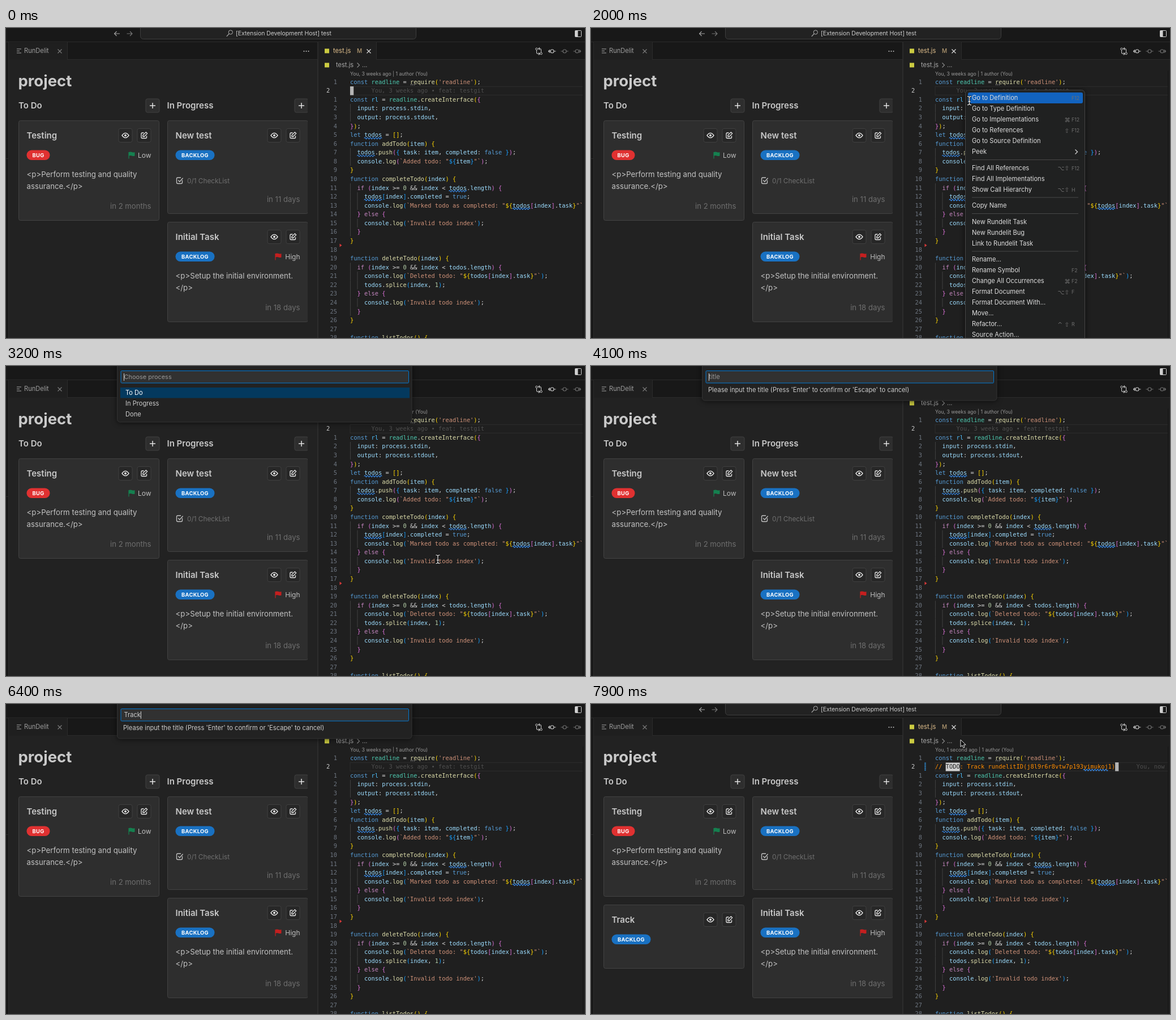
Recreate the animation shown at these times as an HTML page. Size 1023x547 px, loop 8000 ms.

```html
<!DOCTYPE html>
<html lang="en">
<head>
<meta charset="utf-8">
<title>Board and editor</title>
<style>
  html, body { margin: 0; width: 100%; height: 100%; overflow: hidden; background: #181818; }
  svg { display: block; width: 1023px; height: 547px; }
  text { white-space: pre; font-family: Inter, "Open Sans", sans-serif; }
  .mono { font-family: "DejaVu Sans Mono", "Liberation Mono", monospace; }
  .keys { font-family: "DejaVu Sans", sans-serif; }
  .float { filter: drop-shadow(0 1px 5px rgba(0, 0, 0, .6)); }
</style>
</head>
<body>
<svg id="stage" viewBox="0 0 1023 547" xmlns="http://www.w3.org/2000/svg">
  <clipPath id="boardClip"><rect x="4" y="55" width="529" height="492"/></clipPath>
  <clipPath id="codeClip"><rect x="551" y="55" width="468" height="492"/></clipPath>
</svg>
<script type="module">
const LOOP = 8000, STEP = 100;
const T = { menu: 1700, menuEnd: 2900, pick: 3000, title: 4100, done: 6600, insert: 6900, card: 7100, back: 7500 };
const stage = document.getElementById('stage');

const el = (parent, tag, attrs = {}, text) => {
  const node = document.createElementNS('http://www.w3.org/2000/svg', tag);
  for (const key in attrs) node.setAttribute(key, attrs[key]);
  if (text !== undefined) node.textContent = text;
  return parent.appendChild(node);
};
const group = (parent, attrs) => el(parent, 'g', attrs);
const rect = (parent, x, y, width, height, fill, attrs) =>
  el(parent, 'rect', { x, y, width, height, fill, ...attrs });
const line = (parent, d, stroke, width = 1, attrs) =>
  el(parent, 'path', { d, stroke, 'stroke-width': width, fill: 'none', ...attrs });
// y is the visual middle of the line of text
const label = (parent, x, y, size, fill, text, attrs) =>
  el(parent, 'text', { x, y: y + size * .355, 'font-size': size, fill, ...attrs }, text);
const show = (node, on) => node.setAttribute('visibility', on ? 'visible' : 'hidden');

/* ---------- window frame ---------- */
const cross = (x, y, color) => line(stage, `M${x - 3.5} ${y - 3.5}l7 7m0 -7l-7 7`, color, 1.1);

rect(stage, 0, 0, 1023, 547, '#181818');
rect(stage, 4, 55, 547, 492, '#222222');
rect(stage, 4, 26, 104, 30, '#1f1f1f');
rect(stage, 551, 55, 472, 492, '#1f1f1f');
rect(stage, 551, 26, 103, 30, '#1f1f1f');
line(stage, 'M0 24.5H1023M108.5 25V55.5H550M654.5 25V55.5H1023M4.5 25V547M0 230.5H4', '#2b2b2b');
line(stage, 'M551 25V547', '#383838');

line(stage, 'M19 37H27M19 40.5H24M19 44H27', '#a8a8a8', 1.2);
label(stage, 32, 40.5, 11.1, '#9d9d9d', 'RunDelit');
cross(95, 41, '#7c7c7c');
[526.5, 530.5, 534.5].forEach(cx => el(stage, 'circle', { cx, cy: 41, r: 1, fill: '#c0c0c0' }));
rect(stage, 563, 36.5, 8, 8, '#cbcb41');
label(stage, 578, 40.5, 11.2, '#e2c08d', 'test.js');
label(stage, 620, 40.5, 10, '#b39a72', 'M', { 'font-weight': 500 });
cross(641, 41, '#e0e0e0');

// editor actions
line(stage, 'M937.5 39V43Q937.5 45.5 940 45.5H943M941 43.3l2.2 2.2l-2.2 2.2M945.5 43V39Q945.5 36.5 943 36.5H941M943 34.3l-2.2 2.2l2.2 2.2', '#c4c4c4', 1.1);
for (const [cx, cy] of [[937.5, 37], [945.5, 45]])
  el(stage, 'circle', { cx, cy, r: 1.8, fill: '#181818', stroke: '#c4c4c4' });
const commit = (x, color, extra) => {
  el(stage, 'circle', { cx: x, cy: 41, r: 3, fill: 'none', stroke: color, 'stroke-width': 1.2 });
  line(stage, `M${x - 6.5} 41h3.5m6 0h3.5${extra}`, color, 1.2);
};
commit(965, '#c4c4c4', 'M961 38.5l-2.5 2.5l2.5 2.5');
commit(987, '#6c6c6c', '');
commit(1009, '#6c6c6c', 'M1013 38.5l2.5 2.5l-2.5 2.5');
rect(stage, 1005.5, 4.5, 11, 11, 'none', { rx: 1, stroke: '#d0d0d0' });
rect(stage, 1005.5, 4.5, 5, 11, '#d0d0d0');

const command = group(stage);
line(command, 'M201 10H191.5M195.5 6l-4 4l4 4', '#a5a5a5', 1.1);
line(command, 'M213.5 10H223M219 6l4 4l-4 4', '#777777', 1.1);
rect(command, 237.5, -6, 487, 25.5, '#222222', { rx: 5, stroke: '#3d3d3d' });
el(command, 'circle', { cx: 396.8, cy: 7.5, r: 3.6, fill: 'none', stroke: '#b0b0b0' });
line(command, 'M394.2 10.2L389.8 14.8', '#b0b0b0', 1.2);
label(command, 406, 9.5, 10.5, '#cccccc', '[Extension Development Host] test', { 'letter-spacing': -.1 });

/* ---------- board ---------- */
const board = group(stage, { 'clip-path': 'url(#boardClip)' });
const heading = { 'font-weight': 600 };

function button(parent, x, y, icon, fill = '#272727') {
  rect(parent, x - 12, y - 12, 24, 24, fill, { rx: 3, stroke: '#404040' });
  const g = group(parent, { transform: `translate(${x} ${y})` });
  if (icon === 'plus') line(g, 'M-5 0H5M0 -5V5', '#e4e4e4', 1.5);
  if (icon === 'eye') {
    line(g, 'M-6 0Q0 -8.4 6 0Q0 8.4 -6 0Z', '#ececec', 1.3);
    el(g, 'circle', { r: 1.9, fill: '#ececec' });
  }
  if (icon === 'edit')
    line(g, 'M-.5 -4.5H-3.5Q-5 -4.5 -5 -3V3.5Q-5 5 -3.5 5H3Q4.5 5 4.5 3.5V.8M-2 2V-.5L3.3 -5.7L5.6 -3.4L.4 2Z', '#ececec', 1.3);
}

function card(x, y, height, title, badge, o = {}) {
  const g = group(board, { transform: `translate(${x} ${y})` });
  rect(g, .5, .5, 248, height - 1, '#2e2e2e', { rx: 3, stroke: '#424242' });
  label(g, 14.5, 26.5, 15, '#c9c9c9', title, heading);
  button(g, 189, 26.5, 'eye');
  button(g, 222, 26.5, 'edit');
  const bug = badge === 'BUG', width = bug ? 41 : 69;
  rect(g, 14.5, 52.5, width, 17.5, bug ? '#e03131' : '#1971c2', { rx: 8.75 });
  label(g, 14.5 + width / 2, 61.3, 9.4, '#ffffff', badge,
    { 'font-weight': 700, 'letter-spacing': .3, 'text-anchor': 'middle' });
  if (o.level) {
    const fx = o.level === 'Low' ? 195 : 191;
    line(g, `M${fx} 56V67.5`, o.flag, 1.2);
    el(g, 'path', { d: `M${fx} 56q3 -1.2 5.5 0t5 0v6.5q-2.5 1.2 -5 0t-5.5 0z`, fill: o.flag });
    label(g, 234.5, 61.5, 12, '#bdbdbd', o.level, { 'text-anchor': 'end' });
  }
  if (o.check) {
    line(g, 'M26.5 105.5V109.5Q26.5 111.5 24.5 111.5H18.5Q16.5 111.5 16.5 109.5V103Q16.5 101 18.5 101H24M19.3 105.5l2.5 2.7l5.8 -6.5', '#c4c4c4', 1.3);
    label(g, 35, 106.5, 11.8, '#707070', o.check);
  }
  (o.body || []).forEach((text, i) => label(g, 14.5, 95 + 21.6 * i, 13.25, '#c2c2c2', text));
  if (o.due) label(g, 234.5, height - 25.5, 13.15, '#6e6e6e', o.due, { 'text-anchor': 'end' });
  return g;
}

label(board, 21.5, 93, 27.5, '#c9c9c9', 'project', { 'font-weight': 700 });
label(board, 22, 137, 15, '#c9c9c9', 'To Do', heading);
label(board, 284.5, 137, 15, '#c9c9c9', 'In Progress', heading);
button(board, 259, 137, 'plus', '#2e2e2e');
button(board, 522, 137, 'plus', '#2e2e2e');
card(22, 163, 177, 'Testing', 'BUG', { level: 'Low', flag: '#15804f', due: 'in 2 months',
  body: ['<p>Perform testing and quality', 'assurance.</p>'] });
card(285, 163, 165, 'New test', 'BACKLOG', { check: '0/1 CheckList', due: 'in 11 days' });
card(285, 342, 177, 'Initial Task', 'BACKLOG', { level: 'High', flag: '#c41f1f', due: 'in 18 days',
  body: ['<p>Setup the initial environment.', '</p>'] });
const newCard = card(22, 354, 113, 'Track', 'BACKLOG');

/* ---------- editor ---------- */
const editor = group(stage, { 'clip-path': 'url(#codeClip)' });
const CODE = 10.36, ADV = CODE * .602, LEFT = 608, ROW = 15.575;
const rowY = i => 95 + ROW * i;
const colX = n => LEFT + n * ADV;
const mono = (parent, x, y, fill, text, attrs) =>
  label(parent, x, y, CODE, fill, text, { class: 'mono', ...attrs });

const SOURCE = `const readline = require('readline');

const rl = readline.createInterface({
  input: process.stdin,
  output: process.stdout,
});
let todos = [];
function addTodo(item) {
  todos.push({ task: item, completed: false });
  console.log(\`Added todo: "\${item}"\`);
}
function completeTodo(index) {
  if (index >= 0 && index < todos.length) {
    todos[index].completed = true;
    console.log(\`Marked todo as completed: "\${todos[index].task}"\`);
  } else {
    console.log('Invalid todo index');
  }
}

function deleteTodo(index) {
  if (index >= 0 && index < todos.length) {
    console.log(\`Deleted todo: "\${todos[index].task}"\`);
    todos.splice(index, 1);
  } else {
    console.log('Invalid todo index');
  }
}

function listTodos() {`.split('\n');

const BRACKETS = ['#ffd700', '#da70d6', '#179fff'], STRING = '#ce9178';
let depth = 0;
function colorOf(word, next) {
  if (/[([{]$/.test(word)) return BRACKETS[depth++ % 3];
  if (/^[)\]}]/.test(word)) return BRACKETS[--depth % 3];
  if (word[0] === "'") return STRING;
  if (/^(const|let|function|true|false)$/.test(word)) return '#569cd6';
  if (/^(if|else)$/.test(word)) return '#c586c0';
  if (/^\d/.test(word)) return '#b5cea8';
  if (!/^\w/.test(word)) return '#d4d4d4';
  if (next === '(') return '#dcdcaa';
  return { readline: '#4ec9b0', rl: '#4fc1ff' }[word] || '#9cdcfe';
}
function lex(text, out) {
  for (const m of text.matchAll(/'[^']*'|\$\{|[()[\]{}]|\w+|[^\w'$()[\]{}]+/g))
    el(out, 'tspan', { fill: colorOf(m[0], text[m.index + m[0].length]) }, m[0]);
}
function paint(text, out) {
  for (const part of text.split(/(`[^`]*`)/)) {
    if (part[0] !== '`') { lex(part, out); continue; }
    for (const bit of part.split(/(\$\{[^}]*\})/))
      bit[0] === '$' ? lex(bit, out) : el(out, 'tspan', { fill: STRING }, bit);
  }
}
const squiggle = (parent, col, row, chars) =>
  line(parent, `M${colX(col)} ${rowY(row) + 6}q1.2 -2.8 2.4 0` + 't2.4 0'.repeat(Math.round(chars * ADV / 2.4) - 1), '#3794ff', 1.1);

rect(editor, 563, 61.5, 8, 8, '#cbcb41');
label(editor, 583, 65.5, 11.1, '#a9a9a9', 'test.js');
line(editor, 'M620.5 61.5l4 4l-4 4', '#909090', 1.1);
label(editor, 629, 65.5, 11, '#a9a9a9', '...');
const author = label(editor, LEFT, 81, 8.7, '#999999', '');
rect(editor, LEFT, 103.3, 412, 15, 'none', { stroke: '#2d2d2d' });

SOURCE.forEach((text, row) => {
  const y = rowY(row), indent = text.search(/\S/);
  for (let col = 0; col < indent; col += 2)
    line(editor, `M${colX(col) + .5} ${y - ROW / 2}v${ROW}`, '#404040');
  if (row === 1) mono(editor, 566, y, '#cccccc', '2');
  else mono(editor, 585, y, '#6e7681', row ? row - 1 : 1, { 'text-anchor': 'end' });
  paint(text, mono(editor, LEFT, y, '#d4d4d4', ''));
});
[[4, 6], [2, 8], [28, 12], [4, 13], [46, 14]].forEach(([col, row]) => squiggle(editor, col, row, 5));
[715, 718, 721].forEach(x => rect(editor, x, 99.5, 1.3, 1.3, '#b0b0b0'));
el(editor, 'path', { d: 'M589.5 380.5l4 3l-4 3z', fill: '#d33a3a' });

const blame = mono(editor, colX(6), rowY(1), '#4e4e4e', 'You, 3 weeks ago • feat: testgit');
const todo = group(editor);
rect(todo, colX(3), 103.5, 4 * ADV, 15, '#d0d0d0');
const todoText = mono(todo, LEFT, rowY(1), '#ff8c00', '');
[['// '], ['TODO', '#1f1f1f'], [': Track rundelitID(j8l9r6r8vtw7p193yimukoj1)']].forEach(([s, fill = '#ff8c00']) =>
  el(todoText, 'tspan', { fill }, s));
squiggle(todo, 42, 1, 7);
mono(todo, colX(57), rowY(1), '#4e4e4e', 'You, now');
line(todo, 'M590.5 103.5v15', '#2f86c9', 2.5, { 'stroke-dasharray': '2 1' });
const block = rect(editor, LEFT, 103, ADV, 15.5, '#b4b4b4');
line(stage, 'M1019.5 75V547', '#151515');

/* ---------- context menu ---------- */
const MENU = ['Go to Definition|F12', 'Go to Type Definition', 'Go to Implementations|F12|⌘', 'Go to References|F12|⇧',
  'Go to Source Definition', 'Peek', '-', 'Find All References|F12|⇧|⌥', 'Find All Implementations',
  'Show Call Hierarchy|H|⇧|⌥', '-', 'Copy Name', '-', 'New Rundelit Task', 'New Rundelit Bug',
  'Link to Rundelit Task', '-', 'Rename...', 'Rename Symbol|F2', 'Change All Occurrences|F2|⌘',
  'Format Document|F|⇧|⌥', 'Format Document With...', 'Move...', 'Refactor...|R|⇧|^', 'Source Action...'];
const menu = group(stage);
rect(menu, 661.5, 109.5, 211, 460, '#202121', { rx: 6, stroke: '#464646', class: 'float' });
const hover = rect(menu, 666, 0, 203, 19.2, '#1263bf', { rx: 3 });
const itemY = [];
let entryY = 123.5;
MENU.forEach((entry, index) => {
  if (entry === '-') {
    line(menu, `M673 ${entryY - .2}H861`, '#484848');
    entryY += 14.3;
    return;
  }
  const [name, ...keys] = entry.split('|');
  label(menu, 673, entryY, 11.1, '#dedede', name);
  keys.forEach((key, i) => label(menu, 849 - 12.4 * i, entryY + .5, i ? 10.5 : 8.8, '#6f6f6f', key, i ? { class: 'keys' } : {}));
  if (name === 'Peek') line(menu, `M855.5 ${entryY - 4}l4 4l-4 4`, '#cccccc', 1.4);
  itemY.push(entryY);
  entryY += MENU[index + 1] === '-' ? 14.2 : 19;
});

/* ---------- quick input ---------- */
function quickInput(bottom) {
  const g = group(stage);
  rect(g, 196.5, -8, 520.5, bottom + 8, '#222222', { rx: 5, stroke: '#333333', class: 'float' });
  rect(g, 203, 8.5, 508.5, 21.5, '#313131', { rx: 1.5, stroke: '#0078d4' });
  return g;
}
const caret = (parent, x) => rect(parent, x, 13, 1, 13, '#d8d8d8');
const pick = quickInput(99);
label(pick, 208.5, 19.5, 10.95, '#989898', 'Choose process');
caret(pick, 208);
rect(pick, 202, 38, 511, 18.5, '#04395e');
['To Do', 'In Progress', 'Done'].forEach((text, i) => label(pick, 211, 47.3 + 19 * i, 11.1, i ? '#cccccc' : '#ffffff', text));

const titleBox = quickInput(61);
const typed = label(titleBox, 208.5, 19.5, 11.1, '#cccccc', '');
const titleCaret = caret(titleBox, 208);
label(titleBox, 207, 42, 11.15, '#cccccc', "Please input the title (Press 'Enter' to confirm or 'Escape' to cancel)");

/* ---------- pointer ---------- */
const beam = group(stage);
const BEAM = 'M-3.5 -7.5Q0 -7.5 0 -5Q0 -7.5 3.5 -7.5M0 -5V5M-3.5 7.5Q0 7.5 0 5Q0 7.5 3.5 7.5M-2 1.5H2';
line(beam, BEAM, '#111111', 3);
line(beam, BEAM, '#f2f2f2', 1.2);
const arrow = el(stage, 'path', { d: 'M0 0V12.5L3 9.8L5 14.3L7.2 13.3L5.3 9H9.2Z', fill: '#0c0c0c', stroke: '#e8e8e8', 'stroke-width': 1 });

// time, x, y
const PATH = [[900, 722, 300], [1300, 662, 114], [1900, 662, 114], [2550, 764, 336], [2800, 764, 336],
  [3100, 763, 341], [T.back - 100, 763, 341], [7900, 653, 63]];
function pointerAt(t) {
  const last = PATH.length - 1;
  const next = PATH.findIndex(p => t < p[0]);
  const i = next < 0 ? last : Math.max(1, next);
  const a = PATH[i - 1], b = PATH[i];
  const k = Math.min(1, Math.max(0, (t - a[0]) / (b[0] - a[0])));
  const e = k * k * (3 - 2 * k);
  return [a[1] + (b[1] - a[1]) * e, a[2] + (b[2] - a[2]) * e];
}

/* ---------- timeline ---------- */
function render(now) {
  const t = Math.floor(now % LOOP / STEP) * STEP;
  const between = (a, b) => t >= a && t < b;
  const menuOpen = between(T.menu, T.menuEnd), quick = between(T.pick, T.done), inserted = t >= T.insert;

  show(command, !quick);
  show(menu, menuOpen);
  show(pick, between(T.pick, T.title));
  show(titleBox, between(T.title, T.done));
  show(newCard, t >= T.card);
  show(todo, inserted);
  show(blame, !inserted);
  author.textContent = `You, ${inserted ? '1 second' : '3 weeks'} ago | 1 author (You)`;

  const focused = t < T.menu || t >= T.done;
  show(block, focused && (inserted ? t - T.insert : t) % 1000 < 500);
  block.setAttribute('x', inserted ? colX(51) : LEFT);

  const count = Math.max(0, Math.min(5, Math.floor((t - 5500) / 200) + 1));
  typed.textContent = count ? 'Track'.slice(0, count) : 'title';
  typed.setAttribute('fill', count ? '#cccccc' : '#989898');
  titleCaret.setAttribute('x', count ? 208.5 + typed.getComputedTextLength() : 208);

  const [x, y] = pointerAt(t);
  const seen = between(900, T.title) || t >= T.back, overCode = y > 74;
  show(beam, seen && overCode);
  show(arrow, seen && !overCode);
  for (const node of [beam, arrow]) node.setAttribute('transform', `translate(${x} ${y})`);

  const item = itemY.find(c => Math.abs(c - y) <= 9.6);
  show(hover, menuOpen && t > 1950 && item !== undefined);
  if (item !== undefined) hover.setAttribute('y', item - 9.8);
}

const start = performance.now();
function frame() {
  render(performance.now() - start);
  requestAnimationFrame(frame);
}
frame();
</script>
</body>
</html>
```
